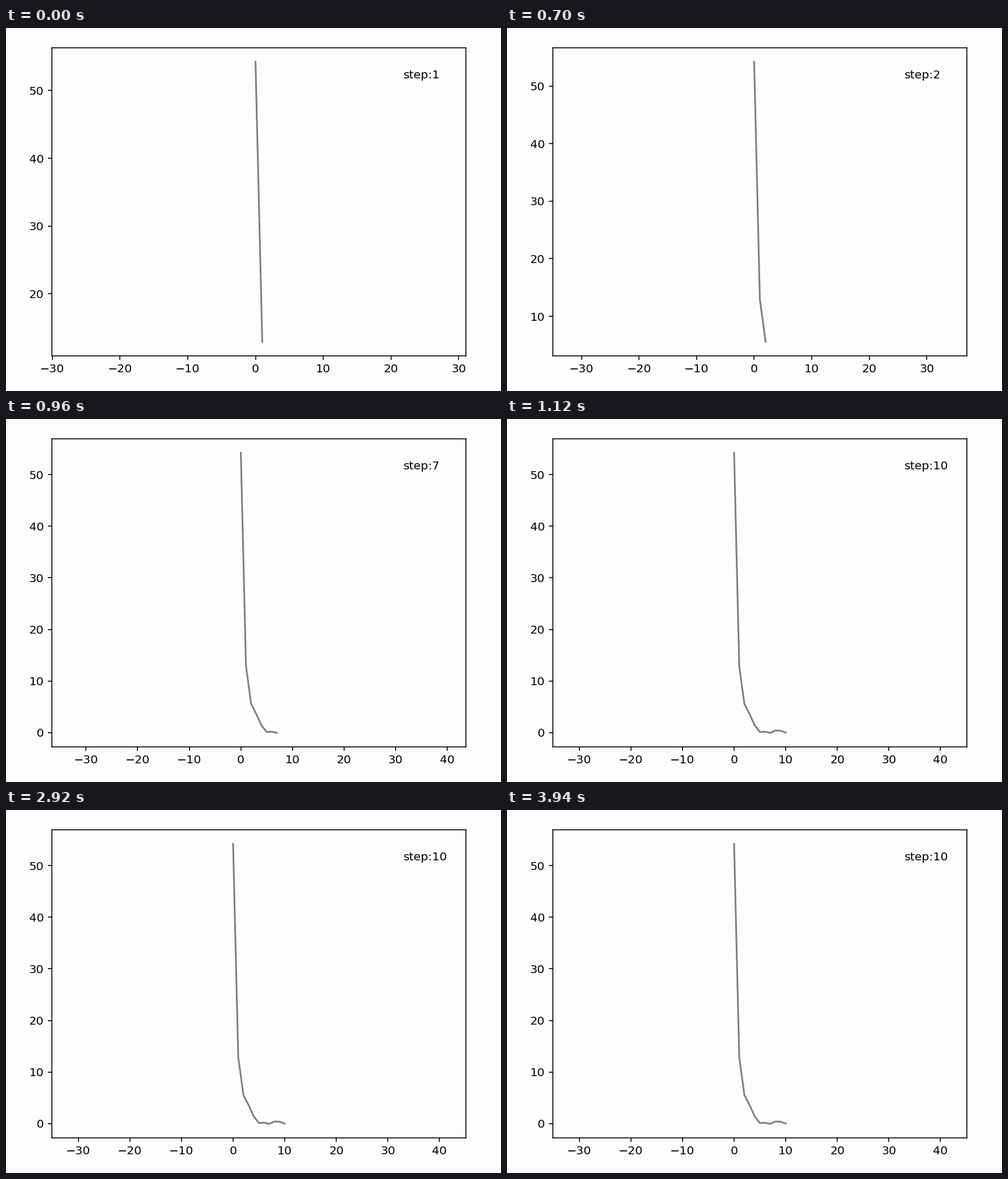
A matplotlib script for the animation above (3960 ms loop, 874x641 px).

```python
import numpy as np
import matplotlib.pyplot as plt
from matplotlib.animation import FuncAnimation
from matplotlib.ticker import MultipleLocator

W, H, DPI = 874, 641, 128
K = 147.4 / DPI  # scale of the default point sizes
LEFT, RIGHT, TOP, BOTTOM = 81, 812, 35, 579
INTERVAL, FRAMES = 20, 198

LOSS = np.array([54.23, 12.9, 5.55, 3.6, 1.42, 0.12, 0.18, -0.05, 0.4, 0.38, 0.02])
STEP_TIMES = [0, 680, 740, 780, 840, 880, 940, 980, 1000, 1100]

plt.rcParams.update({
    "font.family": "DejaVu Sans",
    "font.size": 10 * K,
    "axes.linewidth": 0.8 * K,
    **{f"{a}tick.major.{p}": v * K
       for a in "xy" for p, v in (("size", 3.5), ("width", 0.8), ("pad", 3.5))},
})

fig = plt.figure(figsize=(W / DPI, H / DPI), dpi=DPI, facecolor="#fdfdfd")
ax = fig.add_axes([LEFT / W, 1 - BOTTOM / H, (RIGHT - LEFT) / W, (BOTTOM - TOP) / H],
                  facecolor="#fdfdfd")
ax.xaxis.set_major_locator(MultipleLocator(10))
ax.yaxis.set_major_locator(MultipleLocator(10))
line, = ax.plot([], [], color="gray", lw=1.5 * K)
label = ax.text(0.85, 0.9, "", transform=ax.transAxes)


def update(i):
    step = int(np.searchsorted(STEP_TIMES, i * INTERVAL, side="right"))
    y = LOSS[:step + 1]
    line.set_data(np.arange(step + 1), y)
    label.set_text(f"step:{step}")

    # 5 % margin in y, equal scale in x around the middle of the curve
    lo, hi = y.min(), y.max()
    pad = 0.05 * (hi - lo)
    ax.set_ylim(lo - pad, hi + pad)
    half = 0.55 * (hi - lo) * (RIGHT - LEFT) / (BOTTOM - TOP)
    ax.set_xlim(step / 2 - half, step / 2 + half)
    return line, label


anim = FuncAnimation(fig, update, frames=FRAMES, interval=INTERVAL,
                     repeat=True, repeat_delay=0, blit=False)
plt.show()
```
